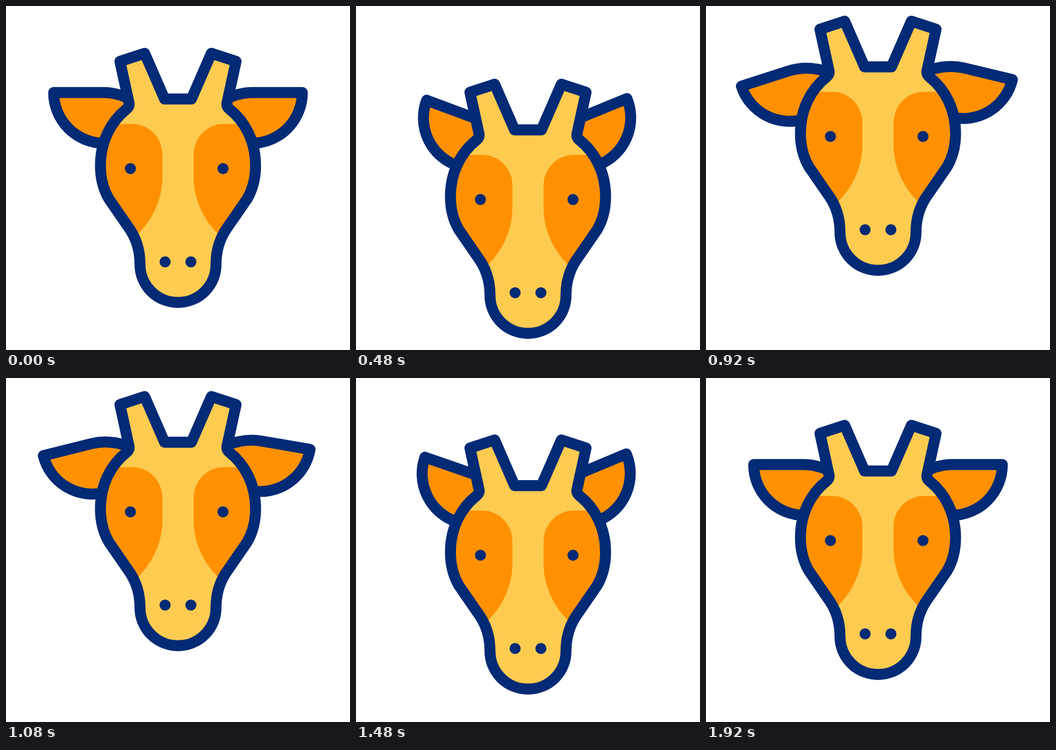
Write an HTML page that moves like this. It is 640x640 px and loops after 2000 ms.

```html
<!DOCTYPE html>
<html lang="en">
<head>
<meta charset="utf-8">
<title>Nodding giraffe</title>
<style>
  html, body { margin: 0; width: 100%; height: 100%; overflow: hidden; background: #fff; }
  svg { display: block; width: 100%; height: 100%; }
  .line { stroke: #032a75; stroke-width: 20.4; stroke-linejoin: round; }
</style>
</head>
<body>
<svg viewBox="0 0 640 640">
  <defs>
    <path id="ear" class="line" fill="#ff9100"
      d="M88.7 161H181C203 161 224 168 243 180L250 255.3H183A94.3 94.3 0 0 1 88.7 161Z"/>
    <path id="half" d="M321 173H295L258 88L212 103L229 181Q230 187 224 192C195 215 175.7 252 175.7 297
      C175.7 321 181.5 342 191.5 359L231.5 417C243 435 249.3 457 249.3 481A70.5 70.5 0 0 0 320 551.5H321"/>
    <path id="cheek" fill="#ff9100" d="M200 219.5H235A56 57 0 0 1 291 276.5V318C291 361 271 401 241 428
      L231.5 417L191.5 359C181.5 342 175.7 321 175.7 297C175.7 267 185 240 200 219.5Z"/>
    <g id="side">
      <use href="#half" fill="#fdcb50"/>
      <use href="#cheek"/>
      <use href="#half" class="line" fill="none"/>
    </g>
  </defs>
  <g id="head">
    <use id="leftEar" href="#ear"/>
    <g transform="translate(640) scale(-1 1)"><use id="rightEar" href="#ear"/></g>
    <use href="#side"/>
    <use href="#side" transform="translate(640) scale(-1 1)"/>
    <g fill="#032a75">
      <circle cx="231.5" cy="302.5" r="10.3"/>
      <circle cx="403.7" cy="302.5" r="10.3"/>
      <circle cx="296" cy="476" r="10.3"/>
      <circle cx="344" cy="476" r="10.3"/>
    </g>
  </g>
</svg>
<script>
const LOOP = 2000;

// Cubic timing curve with control points (a, 0) and (b, 1)
function ease(x, a = 0.4, b = 0.6) {
  let lo = 0, hi = 1, s;
  for (let i = 0; i < 24; i++) {
    s = (lo + hi) / 2;
    const r = 1 - s;
    if (3 * r * r * s * a + 3 * r * s * s * b + s ** 3 < x) lo = s; else hi = s;
  }
  return s * s * (3 - 2 * s);
}

// Keys are [time, value, a, b]; a and b shape the move that ends at that key
const bob = [[0, 0], [438, 59.2], [956, -61], [1520, 28.3, 0.46, 0.62], [1920, 0, 0.33, 0.2]];
const earTurn = (...angles) => [0, 440, 960, 1480, 1920].map((t, i) => [t, angles[i]]);
const leftTurn = earTurn(0, 20.9, -18.3, 19.1, 0);
const rightTurn = earTurn(0, 22.7, -14, 22.7, 0);

function valueAt(keys, t) {
  const i = keys.findIndex(key => key[0] > t);
  if (i < 0) return keys[keys.length - 1][1];
  const [t0, v0] = keys[i - 1], [t1, v1, a, b] = keys[i];
  return v0 + (v1 - v0) * ease((t - t0) / (t1 - t0), a, b);
}

const place = (id, transform) => document.getElementById(id).setAttribute('transform', transform);

function draw(now) {
  const t = now % LOOP;
  place('head', `translate(0 ${valueAt(bob, t)})`);
  place('leftEar', `rotate(${valueAt(leftTurn, t)} 230 258)`);
  place('rightEar', `rotate(${valueAt(rightTurn, t)} 230 258)`);
}

let start;
function tick(now) {
  start ??= now;
  draw(now - start);
  requestAnimationFrame(tick);
}
draw(0);
requestAnimationFrame(tick);
</script>
</body>
</html>
```
